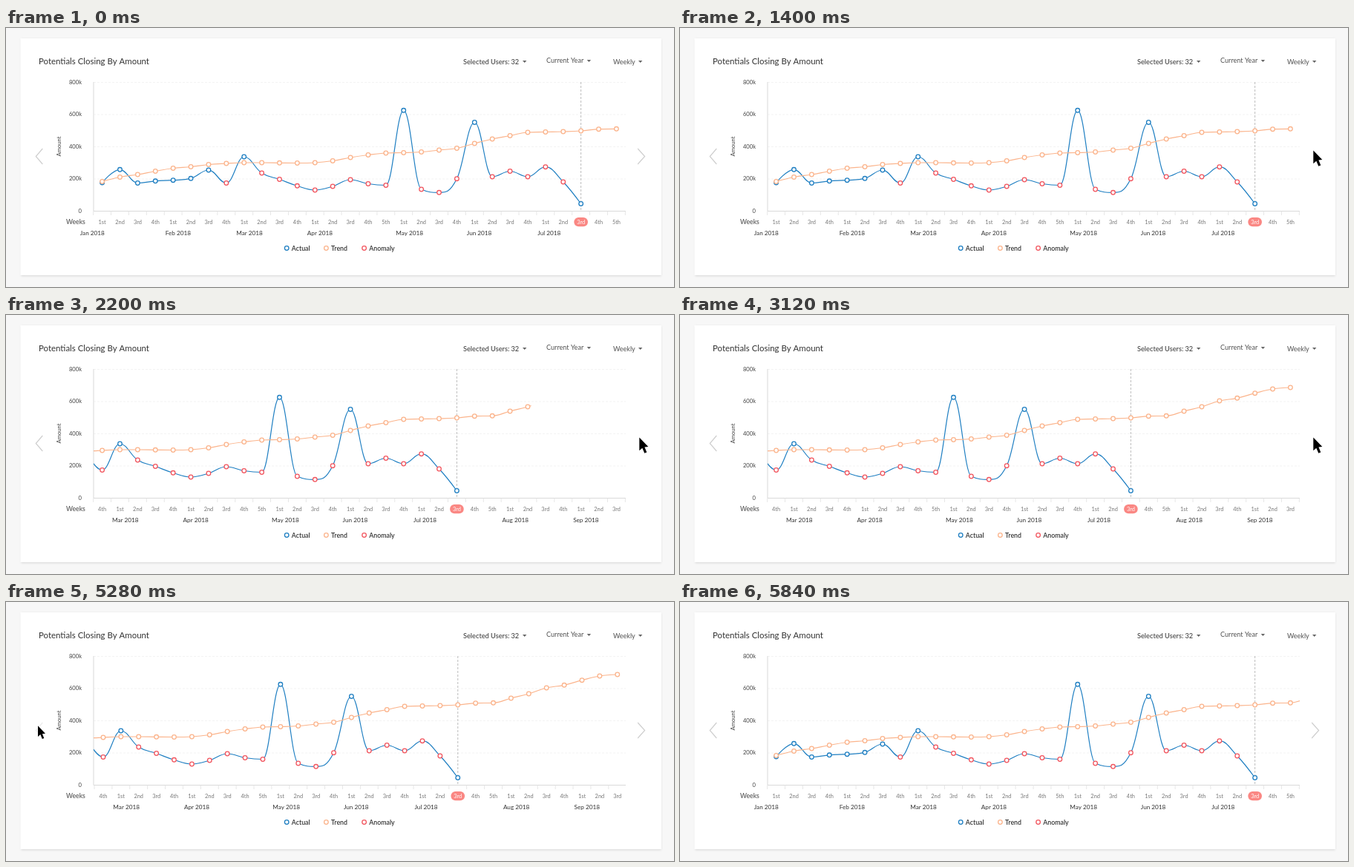
Animation, 900 px wide and 350 px high, one loop 6680 ms. Source, as an HTML page with a canvas:

```html
<!DOCTYPE html>
<html lang="en">
<head>
<meta charset="utf-8">
<title>Potentials Closing By Amount</title>
<style>
html, body { margin: 0; width: 100%; height: 100%; overflow: hidden; background: #f7f7f7; }
canvas { display: block; width: 900px; height: 350px; }
</style>
</head>
<body>
<canvas id="stage"></canvas>
<script>
const LOOP = 6680;
const STEP = 23.89, FIRST = 129.6, SHIFT = 7 * STEP;
const LEFT = 118, RIGHT = 835, TOP = 73.5, BASE = 247.5;
const TODAY = 27, KNOWN = 29;
const BLUE = '#1f7fc2', PEACH = '#fbb48c', RED = '#f2565f';
const FACE = 'Lato, "Open Sans", sans-serif';

const trend = [207.5, 201.5, 198, 193.5, 189.5, 187.5, 184.5, 183, 182, 182, 182.3, 182.5, 182,
  179.5, 175, 171.5, 169, 168.5, 167.5, 165, 162.5, 156, 150, 145.5, 141, 140.5, 140, 139,
  136.7, 136.3, 130, 124, 116, 112.3, 105.7, 100, 98];
const actual = [209, 191.3, 209.5, 206.8, 205.7, 203.3, 192, 209.5, 174, 196, 204.5, 213.3, 219,
  214, 205, 210.5, 212.5, 111.3, 218, 222.3, 203.7, 127.5, 201, 193.5, 201, 187.7, 208, 237.5];
const isNormal = i => i < 7 || [8, 17, 21, 27].includes(i);

const months = [['Jan', 4], ['Feb', 4], ['Mar', 4], ['Apr', 5], ['May', 4], ['Jun', 4],
  ['Jul', 5], ['Aug', 4], ['Sep', 4]];
const weekNames = ['1st', '2nd', '3rd', '4th', '5th'];
const weeks = [], monthMarks = [];
for (const [name, count] of months) {
  monthMarks.push({ name: name + ' 2018', at: weeks.length });
  weeks.push(...weekNames.slice(0, count));
}

const canvas = document.getElementById('stage');
const ctx = canvas.getContext('2d');
const ratio = window.devicePixelRatio || 1;
canvas.width = 900 * ratio;
canvas.height = 350 * ratio;

const clamp = v => Math.max(0, Math.min(1, v));
const span = (t, from, to) => clamp((t - from) / (to - from));
const inOut = p => p < 0.5 ? 4 * p ** 3 : 1 - 4 * (1 - p) ** 3;
const cubic = (a, b, c, d, s) => {
  const r = 1 - s;
  return a * r ** 3 + 3 * b * r * r * s + 3 * c * r * s * s + d * s ** 3;
};

// cubic-bezier(.25, .1, .25, 1)
function ease(p) {
  let lo = 0, hi = 1;
  for (let k = 0; k < 24; k++) {
    const mid = (lo + hi) / 2;
    if (cubic(0, 0.25, 0.25, 1, mid) < p) lo = mid; else hi = mid;
  }
  return cubic(0, 0.1, 1, 1, lo);
}

const scrollAt = t => SHIFT * (t < 5200 ? inOut(span(t, 1400, 2055)) : 1 - inOut(span(t, 5200, 5840)));

function cursorAt(t) {
  if (t < 240) return null;
  if (t < 3800) {
    const s = ease(span(t, 240, 1200)), r = 1 - s;
    return [293 * r * r + 2 * 757 * r * s + 853.3 * s * s, 319 * r * r + 2 * 296 * r * s + 165.5 * s * s];
  }
  const s = ease(span(t, 3800, 4960));
  return [cubic(853.3, 424, 306, 43, s), cubic(165.5, 197, 266, 167.3, s)];
}

function text(str, x, y, size, color, align = 'left', weight = 400) {
  ctx.font = `${weight} ${size}px ${FACE}`;
  ctx.fillStyle = color;
  ctx.textAlign = align;
  ctx.fillText(str, x, y);
}

function line(points, color, width = 1, dash = []) {
  ctx.beginPath();
  points.forEach(([x, y]) => ctx.lineTo(x, y));
  ctx.setLineDash(dash);
  ctx.strokeStyle = color;
  ctx.lineWidth = width;
  ctx.stroke();
  ctx.setLineDash([]);
}

function clipped(x, y, w, h, draw) {
  ctx.save();
  ctx.beginPath();
  ctx.rect(x, y, w, h);
  ctx.clip();
  draw();
  ctx.restore();
}

function ring(x, y, color) {
  ctx.beginPath();
  ctx.arc(x, y, 2.8, 0, Math.PI * 2);
  ctx.fillStyle = '#fff';
  ctx.fill();
  ctx.strokeStyle = color;
  ctx.lineWidth = 1.3;
  ctx.stroke();
}

function caret(x, y) {
  ctx.beginPath();
  ctx.moveTo(x, y);
  ctx.lineTo(x + 5.4, y);
  ctx.lineTo(x + 2.7, y + 3);
  ctx.fillStyle = '#666';
  ctx.fill();
}

// Control offset at a point: flat at peaks and dips, none at the ends
function handle(data, i) {
  if (i === 0 || i === data.length - 1) return [0, 0];
  const before = data[i] - data[i - 1], after = data[i + 1] - data[i];
  const reach = STEP * 0.4;
  if (before * after <= 0) return [reach, 0];
  const rise = Math.min(0.2 * Math.abs(before + after), Math.abs(before), Math.abs(after));
  return [reach, Math.sign(after) * rise];
}

function spline(data, xOf, color) {
  ctx.beginPath();
  ctx.moveTo(xOf(0), data[0]);
  for (let i = 1; i < data.length; i++) {
    const [ax, ay] = handle(data, i - 1), [bx, by] = handle(data, i);
    ctx.bezierCurveTo(xOf(i - 1) + ax, data[i - 1] + ay, xOf(i) - bx, data[i] - by, xOf(i), data[i]);
  }
  ctx.strokeStyle = color;
  ctx.lineWidth = 1.2;
  ctx.stroke();
}

function card() {
  ctx.fillStyle = '#f7f7f7';
  ctx.fillRect(0, 0, 900, 350);
  ctx.save();
  ctx.shadowColor = 'rgba(0,0,0,0.14)';
  ctx.shadowBlur = 3 * ratio;
  ctx.shadowOffsetY = ratio;
  ctx.fillStyle = '#fff';
  ctx.fillRect(19.5, 14, 863.5, 320);
  ctx.restore();

  text('Potentials Closing By Amount', 44, 49.3, 11.45, '#333');
  text('Selected Users: 32', 616, 48.6, 9.2, '#505050', 'left', 600);
  text('Current Year', 728, 47.4, 9.1, '#505050');
  text('Weekly', 818, 48.6, 9, '#505050');
  caret(696, 44);
  caret(782.7, 43);
  caret(852, 44);

  [['Actual', 378.2, BLUE], ['Trend', 431.4, PEACH], ['Anomaly', 482.6, RED]].forEach(([name, x, color]) => {
    ring(x, 297.5, color);
    text(name, x + 6.6, 300.8, 8.8, '#333', 'left', 600);
  });
}

function axes() {
  ['800k', '600k', '400k', '200k', '0'].forEach((label, k) => {
    const y = TOP + k * 43.5;
    text(label, 102, y + 2.4, 7.6, '#444', 'right');
    if (k < 4) line([[LEFT, y], [RIGHT, y]], '#f3f3f3', 1, [3, 2]);
  });
  ctx.save();
  ctx.translate(74, 160);
  ctx.rotate(-Math.PI / 2);
  text('Amount', 0, 0, 7.6, '#444', 'center');
  ctx.restore();
  text('Weeks', 81, 264.7, 8.7, '#444');
  line([[LEFT, 73], [LEFT, BASE]], '#d9d9d9');
  line([[LEFT, BASE], [RIGHT, BASE]], '#d9d9d9');
}

function scale(xOf) {
  clipped(LEFT - 1, 245, RIGHT - LEFT + 1, 28, () => {
    weeks.forEach((name, i) => {
      const x = xOf(i), edge = x - STEP / 2;
      line([[edge, BASE], [edge, 253]], '#e6e6e6');
      const now = i === TODAY;
      if (now) {
        ctx.beginPath();
        ctx.roundRect(x - 9.3, 256, 18.6, 12.2, 6);
        ctx.fillStyle = '#fa8783';
        ctx.fill();
      }
      text(name, x, 264.6, 7.4, now ? '#fff' : '#777', 'center');
    });
  });
  clipped(97, 270, RIGHT - 97, 14, () => {
    for (const { name, at } of monthMarks) {
      text(name, xOf(at) - (at ? 10.5 : 29.8), 280.2, 8.2, '#333');
    }
  });
}

function plot(t, xOf) {
  clipped(LEFT, 70, RIGHT - LEFT, 180, () => {
    line([[xOf(TODAY), 73], [xOf(TODAY), BASE]], '#bdbdbd', 1, [3, 2]);
    spline(actual, xOf, BLUE);
    actual.forEach((y, i) => ring(xOf(i), y, isNormal(i) ? BLUE : RED));

    const drawTrend = data => {
      spline(data, xOf, PEACH);
      data.forEach((y, i) => ring(xOf(i), y, PEACH));
    };
    const grown = span(t, 2055, 2560);
    if (grown === 0) {
      drawTrend(trend.slice(0, KNOWN + 1));
    } else {
      const edge = xOf(KNOWN) + 4 + grown * SHIFT;
      clipped(0, 70, edge, 180, () => drawTrend(trend));
    }
  });
}

function chevrons(t) {
  ctx.globalAlpha = t >= 4720 && t < 5840 ? 0.4 : 1;
  line([[49.3, 163], [40.3, 173.5], [49.3, 184]], '#cecece', 1.2);
  ctx.globalAlpha = 1;
  if (t < 1000 || t >= 3880) line([[851.2, 163], [860.6, 173.5], [851.2, 184]], '#cecece', 1.2);
}

function pointer(x, y, size) {
  const shape = [[0, 0], [0, 17.8], [4, 14.2], [7, 21.3], [10, 20], [7.1, 13.1], [12, 12.6]];
  ctx.beginPath();
  shape.forEach(([dx, dy]) => ctx.lineTo(x + dx * size, y + dy * size));
  ctx.closePath();
  ctx.strokeStyle = '#fff';
  ctx.lineWidth = 2 * size;
  ctx.lineJoin = 'round';
  ctx.stroke();
  ctx.fillStyle = '#000';
  ctx.fill();
  ctx.lineJoin = 'miter';
}

function draw(t) {
  const offset = scrollAt(t);
  const xOf = i => FIRST + i * STEP - offset;
  ctx.setTransform(ratio, 0, 0, ratio, 0, 0);
  card();
  axes();
  scale(xOf);
  plot(t, xOf);
  chevrons(t);
  const spot = cursorAt(t);
  const size = 1 - span(t, 5200, 5680);
  if (spot && size > 0) pointer(...spot, size);
}

const start = performance.now();
function tick() {
  draw((performance.now() - start) % LOOP);
  requestAnimationFrame(tick);
}
tick();
</script>
</body>
</html>
```
